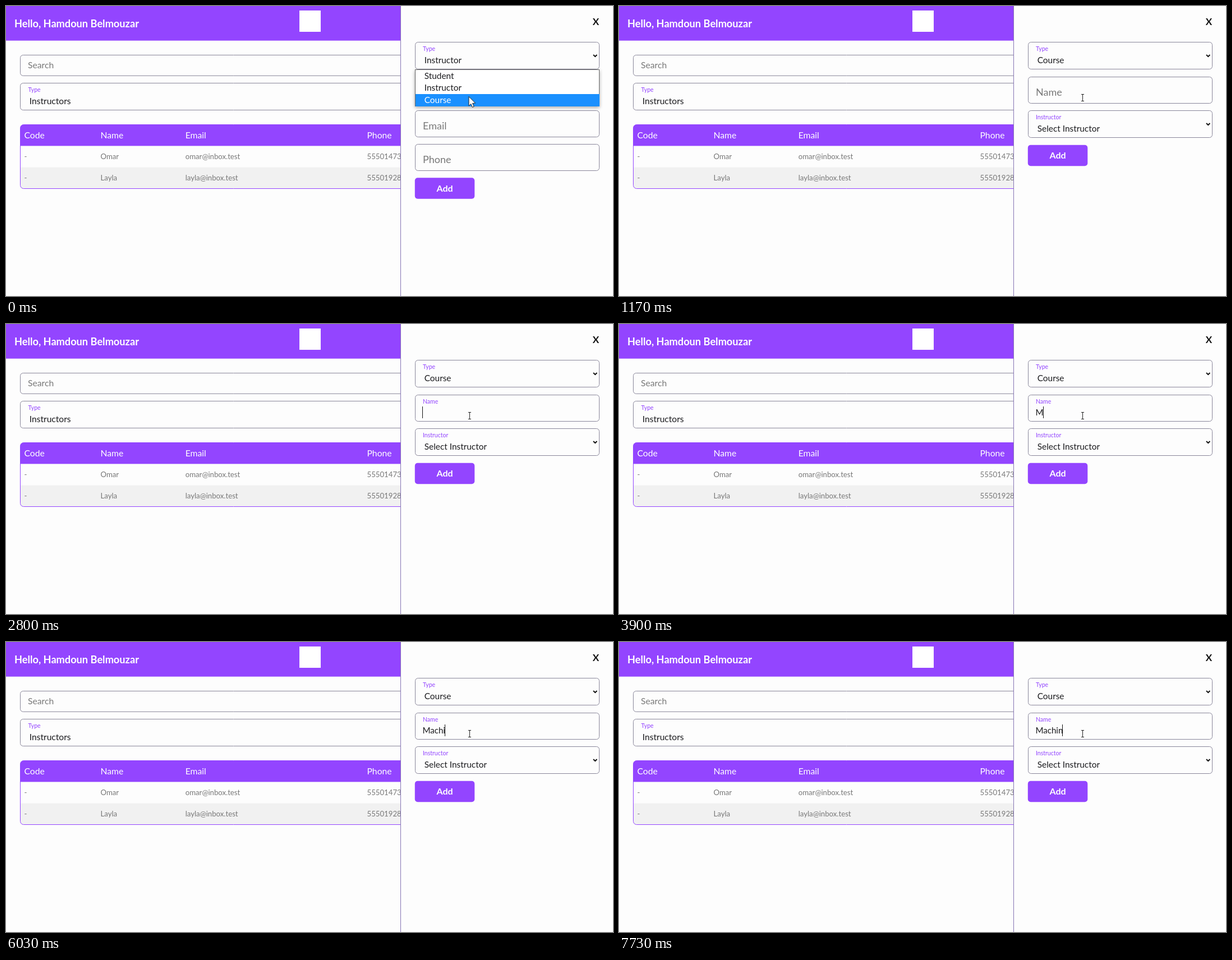
Animation, 1082 px wide and 517 px high, one loop 8 s. Source, as an HTML page with a canvas:

```html
<!DOCTYPE html>
<html lang="en">
<head>
<meta charset="utf-8">
<title>Admin panel</title>
<style>
html, body { margin: 0; width: 100%; height: 100%; overflow: hidden; background: #fdfdfd; }
canvas { display: block; width: 1082px; height: 517px; }
</style>
</head>
<body>
<canvas id="stage" width="1082" height="517"></canvas>
<script>
const ctx = document.getElementById('stage').getContext('2d');
const LOOP = 8000;
const PURPLE = '#9345ff', PAPER = '#fdfdfd', INK = '#1c1c1f', GREY = '#787878', LINE = '#89869a';

const CLOSE = 130;    // dropdown closes
const FOCUS = 1370;   // name field gets focus
const KEYS = [[3870, 'M'], [4730, 'a'], [5030, 'c'], [5470, 'h'], [5830, 'i'], [6250, 'n']];
const BLINK = 510;

function text(str, x, cy, size, color, weight = 400) {
  ctx.font = `${weight} ${size}px Lato, "Open Sans", sans-serif`;
  ctx.fillStyle = color;
  ctx.fillText(str, x, cy + size * 0.36);
  return ctx.measureText(str).width;
}

function rect(x, y, w, h, color) {
  ctx.fillStyle = color;
  ctx.fillRect(x, y, w, h);
}

function round(x, y, w, h, r, fill, stroke) {
  ctx.beginPath();
  ctx.roundRect(x, y, w, h, r);
  if (fill) { ctx.fillStyle = fill; ctx.fill(); }
  if (stroke) { ctx.strokeStyle = stroke; ctx.lineWidth = 1; ctx.stroke(); }
}

function field(y, h) {
  round(729.5, y + 0.5, 328, h, 5, null, LINE);
}

function select(y, label, value) {
  field(y, 48);
  text(label, 743, y + 12.5, 10.5, PURPLE);
  text(value, 745.7, y + 32.5, 15.4, INK);
  ctx.beginPath();
  ctx.moveTo(1047, y + 23);
  ctx.lineTo(1050.2, y + 26.2);
  ctx.lineTo(1053.4, y + 23);
  ctx.strokeStyle = '#111';
  ctx.lineWidth = 2;
  ctx.stroke();
}

function button(y) {
  round(728.8, y - 0.3, 106.5, 37.6, 5, PURPLE);
  text('Add', 767.5, y + 18.5, 16, '#fff', 700);
}

function page() {
  rect(0, 0, 1082, 517, PAPER);
  rect(0, 0, 1082, 61.7, PURPLE);
  text('Hello, Hamdoun Belmouzar', 15, 31, 18.2, '#fff', 700);
  rect(523, 8, 38, 38, '#fff');

  round(25.5, 87.5, 760, 36.8, 5, null, LINE);
  text('Search', 39, 105.5, 15.7, GREY);
  round(25.5, 137.5, 760, 48, 5, null, LINE);
  text('Type', 39.5, 149.5, 10.5, PURPLE);
  text('Instructors', 41.7, 169, 15.6, INK);

  round(25.5, 211.5, 760, 114, 6, PAPER);
  ctx.save();
  ctx.clip();
  rect(25, 211, 760, 38.4, PURPLE);
  rect(25, 287.6, 760, 38, '#f1f1f1');
  ctx.restore();
  round(25.5, 211.5, 760, 114, 6, null, PURPLE);

  const cols = [32.5, 168.5, 319.7, 643.5];
  const row = (cells, y, size, color) => cells.forEach((c, i) => text(c, cols[i], y, size, color));
  row(['Code', 'Name', 'Email', 'Phone'], 230, 15.7, '#fff');
  row(['-', 'Omar', 'omar@inbox.test', '55501473'], 268, 13.2, GREY);
  row(['-', 'Layla', 'layla@inbox.test', '55501928'], 306, 13.2, GREY);
}

function panel() {
  rect(703, 0, 379, 517, PAPER);
  rect(703, 0, 1, 517, '#8574b4');
  text('X', 1045.8, 28, 17, '#111', 700);
}

function dropdown() {
  ctx.save();
  ctx.shadowColor = 'rgba(0,0,0,.35)';
  ctx.shadowBlur = 6;
  ctx.shadowOffsetY = 2;
  rect(729, 113, 329, 66, '#fff');
  ctx.restore();
  ctx.strokeStyle = '#666';
  ctx.lineWidth = 1;
  ctx.strokeRect(729.5, 113.5, 328, 65);
  rect(730, 157, 328, 22, '#1a90ff');
  ['Student', 'Instructor', 'Course'].forEach((s, i) =>
    text(s, 745.7, 124.5 + i * 21.4, 15.4, i === 2 ? '#fff' : INK));
}

function arrow(x, y) {
  const pts = [[0, 0], [0, 16.5], [3.8, 13], [6.4, 19], [9.2, 17.8], [6.6, 12], [11.6, 11.6]];
  ctx.beginPath();
  pts.forEach(([px, py]) => ctx.lineTo(x + px, y + py));
  ctx.closePath();
  ctx.fillStyle = '#fff';
  ctx.fill();
  ctx.strokeStyle = '#222';
  ctx.lineWidth = 1;
  ctx.stroke();
}

function beam(x, y) {
  rect(x, y - 6, 1, 13, '#222');
  for (const dy of [-6, 6]) {
    rect(x - 2, y + dy, 2, 1, '#222');
    rect(x + 1, y + dy, 2, 1, '#222');
  }
}

function nameField(t) {
  field(126, 47);
  const p = Math.min(1, Math.max(0, (t - FOCUS) / 200));
  const k = p * p * (3 - 2 * p);
  const mix = (a, b) => Math.round(a + (b - a) * k);
  text('Name', 743, 153.5 - 15 * k, 18 - 7.5 * k, `rgb(${mix(120, 147)},${mix(120, 69)},${mix(120, 255)})`);
  if (t < FOCUS) return;

  const typed = KEYS.filter(([at]) => t >= at);
  const w = text(typed.map(key => key[1]).join(''), 742.4, 157.5, 15.1, INK);
  // the caret restarts its blink with each key
  const since = typed.length ? t - typed[typed.length - 1][0] : t - FOCUS + 40;
  if (Math.floor(since / BLINK) % 2 === 0) rect(Math.floor(742 + w), 147, 1, 21, '#111');
}

function draw(t) {
  page();
  panel();
  if (t < CLOSE) {
    select(64, 'Type', 'Instructor');
    field(186, 47);
    text('Email', 743, 213.5, 18, GREY);
    field(246, 47);
    text('Phone', 743, 273.5, 18, GREY);
    button(306.5);
    dropdown();
    arrow(825, 161.5);
  } else {
    select(64, 'Type', 'Course');
    nameField(t);
    select(186, 'Instructor', 'Select Instructor');
    button(248);
    beam(826, 163);
  }
}

const start = performance.now();
function tick() {
  draw((performance.now() - start) % LOOP);
  requestAnimationFrame(tick);
}
tick();
</script>
</body>
</html>
```
